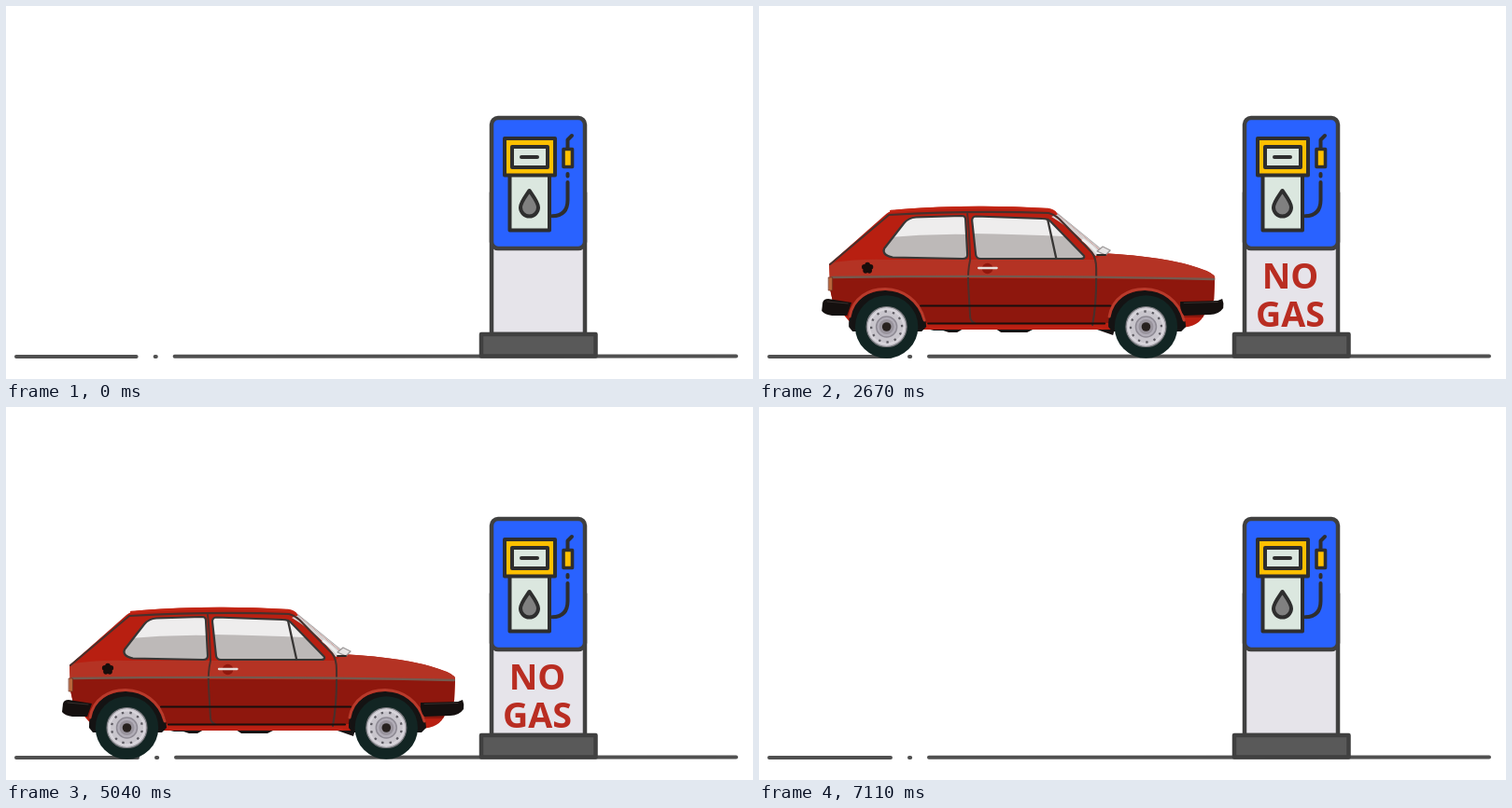
Write an HTML page with a canvas that moves like this. It is 800 px wide and 400 px high and loops after 7140 ms.

```html
<!DOCTYPE html>
<html lang="en">
<head>
<meta charset="utf-8">
<title>No gas</title>
<style>
html, body { margin: 0; width: 100%; height: 100%; overflow: hidden; background: #fff; }
canvas { display: block; }
</style>
</head>
<body>
<canvas id="c" width="800" height="400"></canvas>
<script>
const ctx = document.getElementById('c').getContext('2d');
const LOOP = 7140, SPAN = 774, TAU = Math.PI * 2;
const DARK = '#404040', INK = '#2e2e2e', MINT = '#dbe7df';

// time, left edge of the car
const DRIVE = [
  [0, -432], [350, -214], [690, -77], [1050, 7], [1440, 48], [1710, 57.5],
  [2160, 62], [2880, 68], [3150, 58], [3570, 49], [3800, 46.5], [4350, 55],
  [5040, 60], [5400, 72], [5760, 107], [6000, 152], [6480, 335], [7110, 808]
];

const clamp = (v, a, b) => Math.min(b, Math.max(a, v));
const ramp = (t, a, b) => clamp((t - a) / (b - a), 0, 1);
const slope = i => (DRIVE[i + 1][1] - DRIVE[i][1]) / (DRIVE[i + 1][0] - DRIVE[i][0]);

function tangent(i) {
  if (i === 0) return slope(0);
  if (i === DRIVE.length - 1) return slope(i - 1);
  const a = slope(i - 1), b = slope(i);
  return a * b > 0 ? 2 * a * b / (a + b) : 0;
}

// smooth curve through the keys without overshoot
function carX(t) {
  t = clamp(t, 0, 7110);
  let i = 0;
  while (i < DRIVE.length - 2 && t > DRIVE[i + 1][0]) i++;
  const [t0, x0] = DRIVE[i], [t1, x1] = DRIVE[i + 1];
  const h = t1 - t0, u = (t - t0) / h, v = 1 - u;
  return x0 * (1 + 2 * u) * v * v + x1 * u * u * (3 - 2 * u)
    + h * u * v * (tangent(i) * v - tangent(i + 1) * u);
}

function paint(path, fill, stroke, width) {
  const p = typeof path === 'string' ? new Path2D(path) : path;
  if (fill) { ctx.fillStyle = fill; ctx.fill(p); }
  if (stroke) { ctx.strokeStyle = stroke; ctx.lineWidth = width; ctx.stroke(p); }
}

function box(x, y, w, h, fill, stroke, width, r = 0) {
  const p = new Path2D();
  p.roundRect(x, y, w, h, r);
  paint(p, fill, stroke, width);
}

function disc(x, y, r, fill, stroke, width) {
  const p = new Path2D();
  p.arc(x, y, r, 0, TAU);
  paint(p, fill, stroke, width);
}

const line = (path, colour, width) => paint(path, null, colour, width);

function ground(t) {
  const inn = 1 - Math.pow(1 - ramp(t, 0, 2100), 3.755);
  const out = (1 - Math.cos(Math.PI * ramp(t, 6000, 7110))) / 2;
  const f = t < 3000 ? inn : out;
  const g = 141 - SPAN * (f % 1);
  const y = x => 376 - (x - 11) / 1300;
  const dash = (a, b) => {
    a = Math.max(a, 11);
    b = Math.min(b, 782);
    if (b > a) line(`M${a} ${y(a)}L${b} ${y(b)}`, '#505050', 4);
  };
  for (const s of [g - SPAN, g, g + SPAN]) {
    dash(s + 41, s + SPAN);
    dash(s + 20, s + 21.2);
  }
}

function pump(t) {
  box(520, 200, 100, 152, '#e6e4ea', DARK, 4.5);
  box(520, 120, 100, 140, '#2962ff', DARK, 4.5, 7);
  box(539.5, 181, 42.5, 59.5, MINT, INK, 4);
  box(534, 142, 54, 39.5, '#ffc000', INK, 4);
  box(542, 151, 38, 22, MINT, INK, 4);
  line('M552 162H569', INK, 4);
  paint('M560.5 198C566 206 570 211 570 216A9.5 9.5 0 0 1 551 216C551 211 555 206 560.5 198Z', '#808080', INK, 4);
  box(597, 153.5, 9.5, 19, '#ffc000', INK, 3.6);
  line('M601.5 152V143.5L606 139M601.5 180V182.5M601.5 189V208Q601.5 225 585 225.3', INK, 4);
  sign(ramp(t, 2000, 2350) - ramp(t, 6750, 7000));
  box(509, 352, 122.5, 23.5, '#595959', DARK, 4.5);
}

function sign(alpha) {
  if (alpha <= 0) return;
  ctx.save();
  ctx.globalAlpha = alpha;
  ctx.fillStyle = '#b92d22';
  ctx.textAlign = 'center';
  ctx.font = '900 extra-condensed 48px "Noto Sans", "Open Sans", sans-serif';
  const wide = ctx.measureText('GAS').width;
  if (wide > 74) ctx.font = `900 extra-condensed ${48 * 74 / wide}px "Noto Sans", "Open Sans", sans-serif`;
  ctx.fillText('NO', 569, 302.5);
  ctx.fillText('GAS', 569, 343.5);
  ctx.restore();
}

function wheel(x, spin, speed) {
  const y = 344;
  disc(x, y, 33.7, '#122523');
  disc(x, y, 21.5, '#c8c5cc', '#77777c', 1.2);
  disc(x, y, 18.5, null, '#dad7dd', 2);
  const arc = clamp(0.13 + speed * 1.3, 0.13, 0.5);
  ctx.lineCap = 'butt';
  for (let i = 0; i < 12; i++) {
    const a = spin + i * TAU / 12, p = new Path2D();
    p.arc(x, y, 16.5, a - arc / 2, a + arc / 2);
    ctx.globalAlpha = clamp(1 - speed * 1.6, 0.5, 1);
    line(p, '#5b5960', 2.3);
  }
  ctx.globalAlpha = 1;
  ctx.lineCap = 'round';
  disc(x, y, 11, '#b2aeb8', '#8f8b95', 1.5);
  disc(x, y, 8, '#99949d');
  disc(x, y, 4.8, '#28221f');
}

function glass(path, shade) {
  const p = new Path2D(path);
  paint(p, '#eeeded');
  ctx.save();
  ctx.clip(p);
  paint(shade, '#bdb9b8');
  ctx.restore();
  line(p, '#383635', 2.2);
}

const BODY = 'M68 277L129 223Q133 219 145 218Q220 212 300 217Q310 218 312 223L362 265' +
  'Q430 269 464 281Q480 286 481 291L480 315L470 330Q465 344 444 345L372 347H165L92 341L72 318L69 304Z';

function car(x, speed) {
  ctx.save();
  ctx.translate(x - 60, 0);
  // underside
  paint('M172 346H212L205 350H196L190 348H180ZM246 346H288L280 350H252ZM352 346H374L372 353Z', '#171212');
  paint('M312 222L362 263L350 268Z', '#dddada', '#a9a6a6', 1);
  const body = new Path2D(BODY);
  paint(body, '#b81f11');
  ctx.save();
  ctx.clip(body);
  paint('M66 276Q95 271 130 272H352L362 265Q450 268 484 291V294L66 291Z', '#b43324');
  paint('M66 291L484 293V312L470 334H448L372 340H165L92 336L66 318Z', '#8e170d');
  paint('M313 223L362 265L353 268Q336 244 306 226Z', '#d5d2d2');
  ctx.restore();
  // arches
  for (const cx of [129, 407]) {
    paint(`M${cx - 40} 344C${cx - 42} 292 ${cx + 40} 292 ${cx + 43} 344L${cx + 38} 349H${cx - 36}Z`, '#141313');
    line(`M${cx - 39} 333C${cx - 32} 293 ${cx + 30} 293 ${cx + 41} 337`, '#b93a2b', 3);
  }
  // windows
  glass('M127 260L148 233Q153 227 161 226.5L210 225Q214 225 214 229L216 267Q216 271 211 271L136 269.5Q124 267 127 260Z',
    'M120 249Q170 244 220 245V275H120Z');
  glass('M225 225.5L296 228Q303 228 306 232L341 268Q342 271 337 271H230Q226 271 225 267L221 230Q221 226 225 225.5Z',
    'M215 244Q270 245 320 247L350 275H215Z');
  line('M302 229L311 270', '#383635', 2.3);
  // seams
  line('M69 277L132 224Q220 219 303 222Q311 224 318 232L349 264Q354 270 354 282V293Q354 320 350 342', '#47302c', 2.1);
  line('M216 223Q218 240 219 272Q216 285 217 300L219 334Q220 339 224 340', '#4e2f2a', 2);
  line('M71 291Q270 288 480 293', '#75594e', 2.3);
  line('M166 321.5H369', '#190f0d', 2.2);
  line('M174 340.5H363', '#190f0d', 2.2);
  line('M176 345H360', '#bd2114', 3);
  line('M134 220Q220 213 302 218Q309 219 311 223', '#c32615', 2.5);
  // lamp, mirror, filler cap, handle
  box(67.5, 291, 4, 14, '#b8663a', '#70301f', 0.8);
  line('M340 251Q350 258 357 266', '#eeeeee', 3);
  paint('M355 263L361 258L369 262L364 267Z', '#e7e5e5', '#9c9898', 1.3);
  line('M355 267H364', '#2d2927', 1.8);
  for (let i = 0; i < 5; i++) {
    const a = i * TAU / 5 - Math.PI / 2;
    disc(109 + 3.5 * Math.cos(a), 281 + 3.5 * Math.sin(a), 2.8, '#180d0b');
  }
  disc(109, 281, 3.5, '#180d0b');
  disc(237.5, 281.5, 5.8, '#8f170d');
  line('M228 281H247.5', '#e8dfdc', 2.3);
  // bumpers
  paint('M61 318Q62 314 67 314L92 318L87 332H71Q63 331 60 327Z', '#15100f');
  paint('M444 317L484 316L489 314Q491 319 490 324Q485 331 476 331L448 332Q443 326 444 317Z', '#15100f');
  line('M66 317L88 319M448 318.5L484 317.5', '#37302e', 1);
  wheel(129.5, x / 33, speed);
  wheel(407.3, x / 33, speed);
  ctx.restore();
}

function draw(t) {
  ctx.fillStyle = '#fff';
  ctx.fillRect(0, 0, 800, 400);
  ctx.lineCap = ctx.lineJoin = 'round';
  ground(t);
  pump(t);
  const x = carX(t);
  if (x > -431 && x < 802) car(x, Math.abs(carX(t + 15) - carX(t - 15)) / 30);
}

const start = performance.now();
function tick() {
  draw((performance.now() - start) % LOOP);
  requestAnimationFrame(tick);
}
tick();
</script>
</body>
</html>
```
